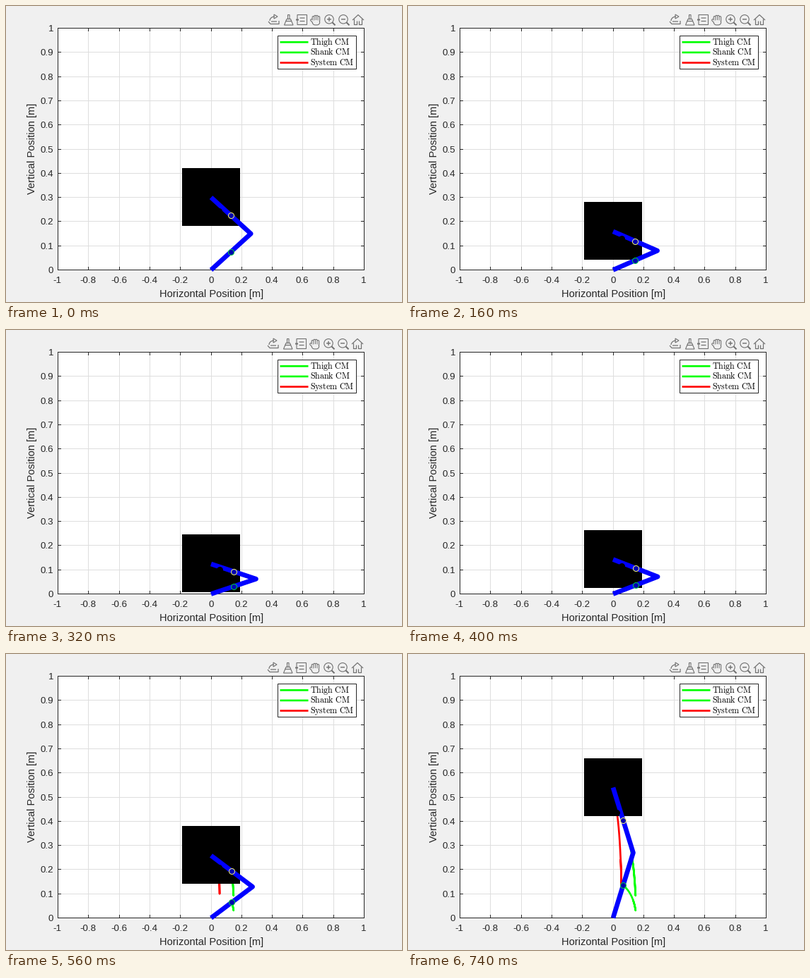
These frames come from a looping animation (560 by 420 pixels, 2740 ms). A matplotlib script:

```python
import numpy as np
import matplotlib.pyplot as plt
from matplotlib.animation import FuncAnimation
from matplotlib.patches import Circle, Polygon, Rectangle

W, H, DPI = 560, 420, 80
PT = 72 / DPI              # points per pixel
STEP, LOOP = 20, 2740      # ms
LAST = 37                  # step at which the leg stops
LINK = 0.3                 # thigh and shank length in metres
LEFT, RIGHT, TOP, BOTTOM = 73.5, 506.5, 31.5, 374.5
BACK, INK, ICON = "#f0f0f0", "#262626", "#707070"
GREEN, RED, BLUE, NAVY = "#00ff00", "#ff0000", "#0000ff", "#0000b0"

plt.rcParams["font.family"] = "Liberation Sans"
plt.rcParams["mathtext.fontset"] = "cm"
plt.rcParams["path.snap"] = False


def px(x):
    return (LEFT + RIGHT) / 2 + (RIGHT - LEFT) / 2 * np.asarray(x)


def py(y):
    return BOTTOM - (BOTTOM - TOP) * np.asarray(y)


# squat and push-off: the hip height is even about the lowest point
u = np.arange(LAST + 1) * STEP / 1000 - 0.298
hip = 0.123 + 1.878 * u**2 + 1.297 * u**4
knee = np.sqrt(LINK**2 - (hip / 2) ** 2)

fig = plt.figure(figsize=(W / DPI, H / DPI), dpi=DPI, facecolor=BACK)


def layer():
    ax = fig.add_axes([0, 0, 1, 1])
    ax.set(xlim=(0, W), ylim=(H, 0))
    ax.axis("off")
    return ax


ax, bar = layer(), layer()


def line(x, y, color=INK, width=1, z=2, on=None, **kw):
    kw.setdefault("solid_capstyle", "butt")
    return (on or ax).plot(x, y, color=color, lw=width * PT, zorder=z,
                           clip_on=False, **kw)[0]


def text(x, y, s, size, **kw):
    kw.setdefault("color", INK)
    kw.setdefault("va", "baseline")
    ax.text(x, y, s, fontsize=size * PT, **kw)


def draw_axes():
    ax.add_patch(Rectangle((LEFT, TOP), RIGHT - LEFT, BOTTOM - TOP,
                           fc="white", ec=INK, lw=PT, zorder=0))
    for k in range(11):
        v = (k - 5) / 5
        x, y = np.floor(px(v)) + 0.5, np.floor(py(k / 10)) + 0.5
        line([x, x], [TOP, BOTTOM], "#dedede", z=1)
        line([LEFT, RIGHT], [y, y], "#dedede", z=1)
        for edge, inward in ((TOP, 4.5), (BOTTOM, -4.5)):
            line([x, x], [edge, edge + inward])
        for edge, inward in ((LEFT, 4.5), (RIGHT, -4.5)):
            line([edge, edge + inward], [y, y])
        text(x - 0.7, 393, f"{v:g}", 13.33, ha="center")
        text(67, y + 4.8, f"{k / 10:g}", 13.33, ha="right")
    line([LEFT, RIGHT, RIGHT, LEFT, LEFT], [TOP, TOP, BOTTOM, BOTTOM, TOP], z=2.5)
    text(290.5, 413, "Horizontal Position [m]", 14.67, ha="center")
    text(44.3, 202, "Vertical Position [m]", 14.67, rotation=90,
         ha="right", va="center")


def draw_legend():
    ax.add_patch(Rectangle((384.5, 42.5), 111, 47, fc="white", ec=INK,
                           lw=PT, zorder=8))
    rows = (("Thigh", GREEN), ("Shank", GREEN), ("System", RED))
    for k, (name, color) in enumerate(rows):
        y = 51.3 + 14.6 * k
        line([387.5, 427.5], [y, y], color, 2.67, z=9)
        text(430.3, y + 3.3, rf"$\mathrm{{{name}\ CM}}$", 12, color="black", zorder=9)


def draw_toolbar():
    def stroke(x, y, width=1.2, color=ICON, **kw):
        line(x, y, color, width, on=bar, **kw)

    def add(patch):
        patch.set(fc="none", ec=ICON, lw=1.1 * PT)
        bar.add_patch(patch)

    # export: curved arrow over a tray
    a = np.linspace(0, np.pi / 2, 12)
    stroke(380 - 7 * np.sin(a), 15 + 6 * (1 - np.cos(a)))
    add(Polygon([(379, 12), (384, 15), (379, 18)]))
    stroke([371, 374, 386, 386], [22, 25.5, 25.5, 21])
    stroke([375, 383], [22, 22])

    # brush
    add(Rectangle((398.5, 12.5), 2.5, 6))
    add(Polygon([(397, 18.5), (402.5, 18.5), (406, 27), (393.5, 27)]))
    stroke([395.5, 404], [21.5, 21.5])

    # data tip
    add(Rectangle((412, 12.5), 13.5, 14))
    for y in (17, 21.5):
        stroke([415.5, 422.5], [y, y])
    stroke([410, 414], [19.5, 19.5], 2)

    # hand: thick strokes, hollowed out by thinner ones
    for z, (color, trim) in enumerate(((ICON, 0), (BACK, 2.2))):
        for k in range(4):
            x = 434.5 + 2.6 * k
            stroke([x, x], [14.5 + 0.6 * (k - 1.5) ** 2, 21], 3.8 - trim, color,
                   z=3 + z, solid_capstyle="round")
        stroke([432, 435], [20, 23], 3.8 - trim, color, z=3 + z,
               solid_capstyle="round")
        stroke([437, 440], [23.2, 23.2], 8.5 - trim, color, z=3 + z,
               solid_capstyle="round")

    # zoom in and out
    for x in (457, 477):
        add(Circle((x, 18.8), 6.2))
        stroke([x + 4.5, x + 8.5], [23.3, 27.3], 2)
        stroke([x - 3, x + 3], [18.8, 18.8], 1.4)
    stroke([457, 457], [15.8, 21.8], 1.4)

    # home
    stroke([490, 498, 506], [20, 12.5, 20])
    for half, top in ((5.5, 18.5), (1.5, 21.5)):
        for side in (-half, half):
            stroke([498 + side] * 2, [top, 27])
    for side in (-1, 1):
        stroke([498 + 1.5 * side, 498 + 5.5 * side], [26.5, 26.5])


draw_axes()
draw_legend()
draw_toolbar()

# centres of mass: share of knee offset, share of hip height, colours
masses = ((0.5, 0.75, GREEN, "#f4f470", NAVY),
          (0.5, 0.25, GREEN, "#00d040", NAVY),
          (0.19, 0.81, RED, "black", "black"))
trails, dots = [], []
for _, _, color, edge, face in masses:
    trails.append(line([], [], color, 2.67, z=3, solid_joinstyle="round"))
    dots.append(line([], [], z=6, marker="o", ms=8 * PT, mfc=face, mec=edge,
                     mew=PT))
# the system dot is hidden by the body except where it meets the leg
body = ax.add_patch(Rectangle((249, 0), 82, 82, fc="black", ec="none", zorder=4))
leg = line([], [], BLUE, 6.67, z=5, solid_joinstyle="round")


def update(i):
    n = min(i, LAST)
    h, k = hip[n], knee[n]
    for trail, dot, (fx, fy, *_) in zip(trails, dots, masses):
        trail.set_data(px(fx * knee[:n + 1]), py(fy * hip[:n + 1]))
        dot.set_data([px(fx * k)], [py(fy * h)])
    body.set_y(np.floor(py(h) - 41))
    leg.set_data(px([0, k, 0]), py([0, h / 2, h]))
    shift = min(n, 1)     # toolbar settles one pixel to the left
    bar.set_xlim(shift, W + shift)
    return [*trails, body, leg, *dots]


anim = FuncAnimation(fig, update, frames=LOOP // STEP, interval=STEP,
                     repeat=True, repeat_delay=0, blit=False)
plt.show()
```
